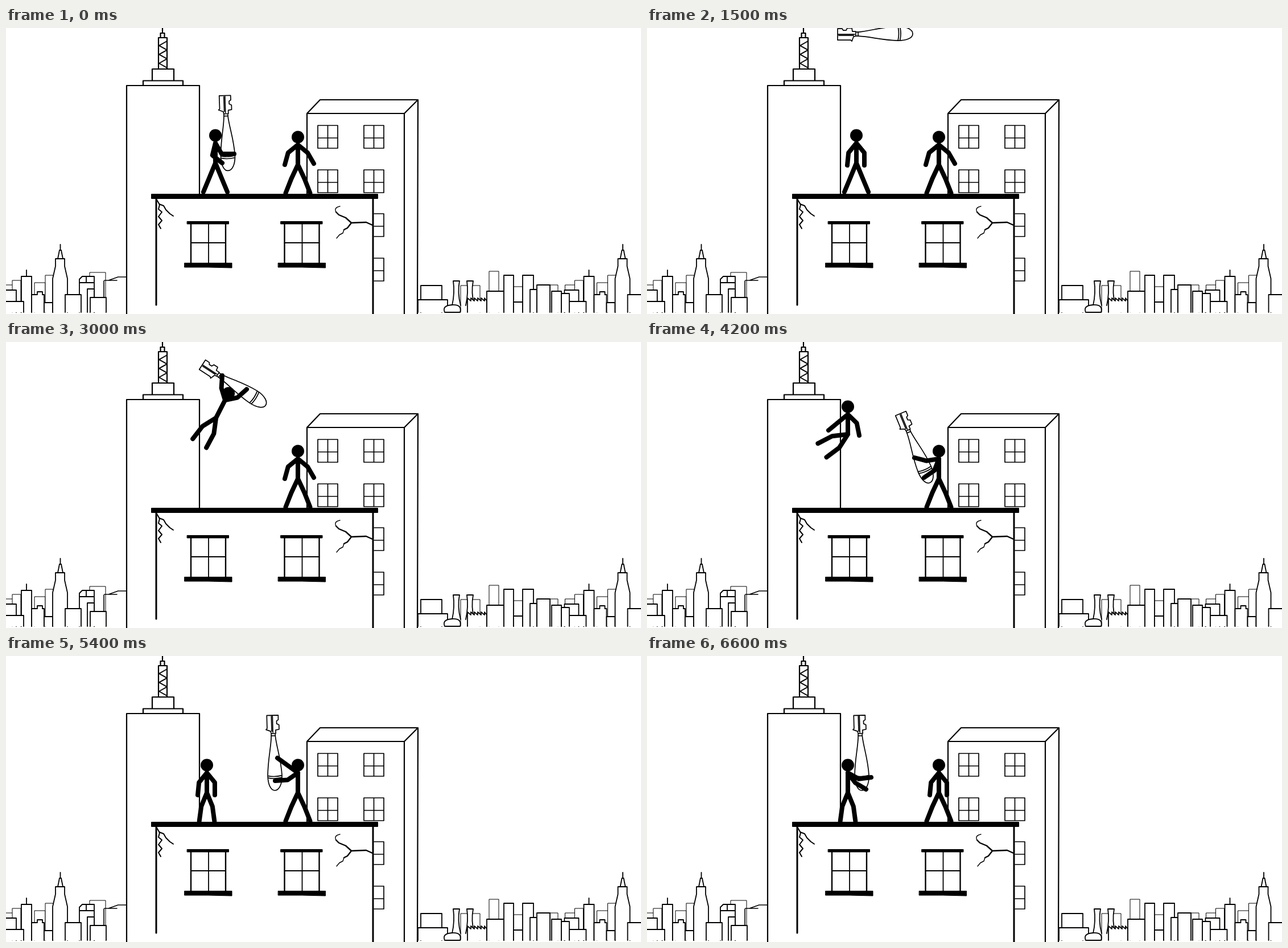
Animation, 1116 px wide and 502 px high, one loop 7.05 s. Source, as an HTML page:

```html
<!DOCTYPE html>
<html lang="en">
<head>
<meta charset="utf-8">
<title>Rooftop catch</title>
<style>
  html, body { margin: 0; width: 100%; height: 100%; overflow: hidden; background: #fff; }
  svg { display: block; width: 100%; height: 100%; }
</style>
</head>
<body>
<svg viewBox="0 0 1116 502" fill="none" stroke="#000" stroke-width="2" stroke-linejoin="round" stroke-linecap="round">
  <defs>
    <g id="pane" stroke-width="1.7"><path d="M0 0H35V40H0ZM17.5 0V40M0 22H35"/></g>
    <g id="side" stroke-width="1.7"><path d="M0 0H17V40H0M0 22H17"/></g>
    <g id="window">
      <path stroke-width="2.4" d="M325 343V413M386 343V413"/>
      <path stroke-width="1.8" d="M356 343V413M325 377H386"/>
      <path fill="#000" stroke-width="1" d="M318.5 339.500H391.5V344H318.500ZM314 412.500H397V421L356 420H314Z"/>
    </g>
    <g id="bomb" stroke-width="1.7">
      <path d="M-66 -9H-58L-56 -6H-51L-49 -10H-41L-40 -4H-34V4L-38 5L-41 13L-43 11H-66ZM-65 1H-36M-64 3H-38M-34 -3H-30V4H-34"/>
      <path d="M-30 -3C-8 -5 10 -12 40 -13C56 -13 66 -7 66 0S56 12 40 12C10 11 -8 5 -30 4M40 -13Q43 0 40 12M43.500 -13Q46.500 0 43.500 12"/>
    </g>
    <g id="city" fill="#fff" stroke-width="1.8"></g>
  </defs>

  <use href="#city"/>
  <use href="#city" x="988.500"/>
  <path stroke-width="1.6" d="M172 473V444M173 443H195M180 443L197 437H212"/>
  <g id="works" fill="#fff" stroke-width="1.8"></g>

  <path stroke-width="2.2" d="M212 502V101H340V291M241 100V92.500H311V100M257 92V72H295V92M268 71V17H283V71M271.500 17V9H278.500V17M275 9V0"/>
  <path id="lattice"/>

  <path stroke-width="2.2" d="M529 291V150H700V502M529 150L552 126H724L700 150M724 126L723 502"/>
  <g id="panes"></g>

  <rect x="264" y="296" width="381" height="206" fill="#fff" stroke="none"/>
  <path stroke-width="3" d="M264 300V486M645 300V502"/>
  <use href="#window"/><use href="#window" x="164.500"/>
  <path d="M264 300L270 310 268 318 274 323 268 331 274 338 268 345 272 352M269 309L277 312 281 319 288 326 294 330"/>
  <path stroke-width="2.4" d="M644 346L633 341 607 342 597 333 585 328 580 323M607 342L600 351 594 354"/>
  <path stroke-width="1.4" d="M580 323Q576 315 587 313M594 354L592 360 586 363 581 369"/>

  <use id="spare" href="#bomb" x="118" y="488"/>
  <use id="shell" href="#bomb"/>
  <g stroke-width="8"><path id="left"/><path id="right"/></g>
  <g fill="#000" stroke="none"><circle id="leftHead" r="11"/><circle id="rightHead" r="11"/></g>
  <rect x="255" y="291" width="399" height="9" rx="1" fill="#000" stroke="none"/>
</svg>
<script>
const STEP = 150, LOOP = 7050;
const TORSO = 35, ARM = 22, LEG = 55, GROUND = 289.6;
const $ = id => document.getElementById(id);

// ---- scenery ----
const line = (d, width = 1.8) => `<path stroke-width="${width}" d="${d}"/>`;
const block = (x, y, right, width) => line(`M${x} 499V${y}H${right}V499`, width);
const far = (x, y, right) => block(x, y, right, 1);
const chimney = x => line(`M${x} 487Q${x + 5} 465 ${x + 2} 444H${x + 13}Q${x + 9} 465 ${x + 15} 487`);

$('city').innerHTML =
  far(-6, 451, 26) + far(11, 443, 26) + far(50, 447, 69) + far(69, 434, 83) + far(147, 429, 175) +
  block(-7, 460, 18) + block(27, 436, 45) + line('M36 436V425') + block(-7, 480, 31) +
  line('M45 499V468H55V463H64V468H67V499') + block(67, 482, 82) +
  line('M82 499V440L87 418V405H103V418L108 440V499M91 405L94 390H97L100 405M95.500 390V380') +
  line('M129 499V441L134 436H155V499M129 447H155M141 436V447') +
  block(104, 468, 132) + block(143, 458, 155) + block(148, 473, 176);

$('works').innerHTML =
  far(799, 452, 833) + far(849, 427, 866) + far(892, 454, 908) + far(956, 451, 970) +
  block(729, 452, 766) + block(724, 477, 776) + chimney(784) + chimney(808) +
  line('M811 499V474' + 'l6 5v-5'.repeat(5) + 'l4 5V499') +
  line('M771 499Q766 487 784 486T798 499Z') +
  block(845, 462, 875) + block(875, 434, 892) + block(892, 481, 908) + block(908, 434, 927) +
  block(921, 459, 933) + block(976, 466, 990) + block(959, 462, 976) + block(933, 451, 956);

let zigzag = 'M283 23';
for (let i = 1; i < 7; i++) zigzag += `L${i % 2 ? 269 : 283} ${23 + 7.8 * i}`;
$('lattice').setAttribute('d', zigzag);

const use = (id, x, y) => `<use href="#${id}" x="${x}" y="${y}"/>`;
for (const row of [0, 78]) {
  $('panes').innerHTML += use('pane', 548, 171 + row) + use('pane', 629, 171 + row) + use('side', 647, 326 + row);
}

// ---- motion, in steps ----
const ramp = (n, from, to) => Math.min(1, Math.max(0, (n - from) / (to - from)));
const bump = (n, from, to) => Math.sin(Math.PI * ramp(n, from, to));
const mix = (a, b, u) => a + (b - a) * u;
const outPow = (u, p) => 1 - (1 - u) ** p;

// two hands, measured from the neck
const hands = {
  hold: [12, 35, 33, 19], up: [-21, -37, 22, -30], rest: [-16, 39, 14, 39],
  hang: [-5, -43, 38, -19], fall: [-34, 28, 20, 37], grab: [32, 29, 41, 8],
  idle: [-23, 35, 28, 33], take: [-43, -2, -26, 33], lift: [-36, -26, -40, 14],
  wide: [-41, 8, 41, 8]
};
// "name from-to": the hands reach that pose between those steps
const script = text => text.split(', ').map(part => {
  const [name, span = '0-0'] = part.split(' ');
  return [hands[name], ...span.split('-').map(Number)];
});
const leftHands = script('hold, up 2-5, rest 8-10, up 14-17, hang 17-20, grab 20-21, fall 27-28, rest 30-33, grab 42-44');
const rightHands = script('idle, take 22-25, lift 30-36, wide 37-39, rest 39-42');
const handsAt = (parts, n) => parts.reduce((now, [goal, from, to]) =>
  to ? now.map((v, i) => mix(v, goal[i], ramp(n, from, to))) : goal, []);

function leftAt(n) {
  const arms = handsAt(leftHands, n);
  if (n > 20) {
    const drop = ramp(n, 27, 30);
    return { x: drop ? 353 : 369, y: mix(88, 205, drop) + 10 * bump(n, 30, 34),
      lean: 0, swing: 58 * (1 - ramp(n, 28, 30)), spread: 15, arms };
  }
  const tilt = ramp(n, 14, 20);
  return { x: 368 + 17 * tilt * tilt, y: 202 + 12 * bump(n, 10, 14) - 100 * ramp(n, 13, 20),
    lean: 27 * tilt, swing: 33 * tilt, spread: n < 13 ? 22.5 : 15, arms };
}

const rightAt = n => ({ x: 513, y: 205, lean: 0, swing: 0, spread: 23.4, arms: handsAt(rightHands, n) });

// centre and angle of the bomb
function shellAt(n) {
  if (n < 8) {
    const rise = ramp(n, 2, 6);
    return [mix(388, 379, rise) + 18 * bump(n, 2, 6), 184.5 - 39 * Math.max(0, n - 2), mix(88, 72, ramp(n, 2, 4))];
  }
  if (n <= 20) return [401, 75 - 14 * ((20 - n) / 6) ** 3, 33 * ramp(n, 14, 20) ** 2];
  if (n <= 28) {
    const u = ramp(n, 20, 26);
    return [mix(401, 472, outPow(u, 3)), mix(75, 186, u * u), mix(33, 67.6, outPow(u, 5))];
  }
  const u = ramp(n, 36, 44);
  return [mix(471, 376, u), 186 - 16 * ramp(n, 34, 36) - 30 * bump(n, 36, 44), mix(67.6, 88.5, ramp(n, 28, 34))];
}

// ---- drawing ----
function limb(x, y, dx, dy, bow) {
  const k = bow / Math.hypot(dx, dy);
  return `M${x} ${y}L${x + dx / 2 + dy * k} ${y + dy / 2 - dx * k} ${x + dx} ${y + dy}`;
}

function arm(x, y, dx, dy, side) {
  const bow = Math.sqrt(Math.max(0, ARM * ARM - (dx * dx + dy * dy) / 4));
  const turn = dy > Math.abs(dx) ? side : -Math.sign(dx);   // a raised elbow hangs down
  return limb(x, y, dx, dy, bow * turn);
}

function leg(x, y, angle, side) {
  const reach = Math.min(LEG, (GROUND - y) / Math.cos(angle));
  const bow = y < 230 ? 5 : 0.9 * (LEG - reach);
  return limb(x, y, reach * Math.sin(angle), reach * Math.cos(angle), bow * side);
}

function drawFigure(id, { x, y, lean, swing, spread, arms }) {
  const rad = Math.PI / 180, sin = Math.sin(lean * rad), cos = Math.cos(lean * rad);
  const hx = x - TORSO * sin, hy = y + TORSO * cos;
  const [ax, ay, bx, by] = arms;
  $(id).setAttribute('d', `M${x} ${y}L${hx} ${hy}` + arm(x, y, ax, ay, -1) + arm(x, y, bx, by, 1) +
    leg(hx, hy, (-swing - spread) * rad, -1) + leg(hx, hy, (spread - swing) * rad, 1));
  $(id + 'Head').setAttribute('cx', x + 13.5 * sin);
  $(id + 'Head').setAttribute('cy', y - 13.5 * cos);
}

function draw(ms) {
  let n = Math.floor((ms % LOOP) / STEP);
  if (n === 27 || n === 35) n--;   // short pauses after each catch
  drawFigure('left', leftAt(n));
  drawFigure('right', rightAt(n));
  const [x, y, angle] = shellAt(n);
  $('shell').setAttribute('transform', `translate(${x} ${y}) rotate(${angle})`);
  $('spare').setAttribute('visibility', n >= 6 && n <= 8 ? 'visible' : 'hidden');
}

const start = performance.now();
function tick() {
  draw(performance.now() - start);
  requestAnimationFrame(tick);
}
tick();
</script>
</body>
</html>
```
